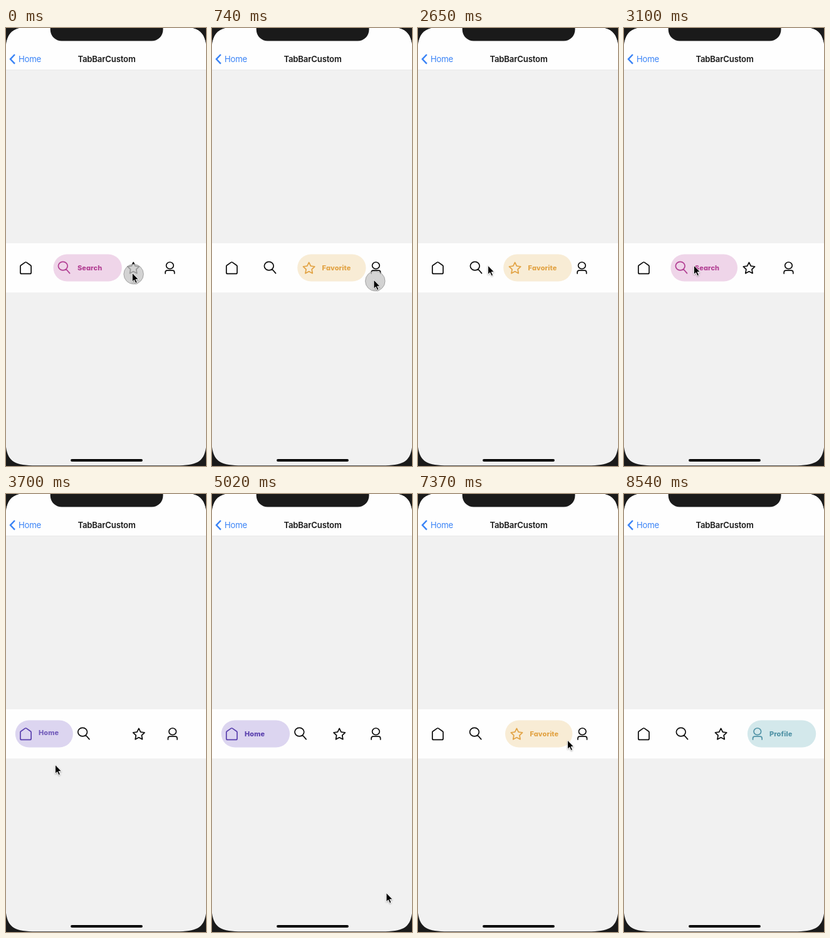
These frames come from a looping animation (319 by 694 pixels, 8.69 s). An HTML page:

```html
<!DOCTYPE html>
<html lang="en">
<head>
<meta charset="utf-8">
<title>Tab bar</title>
<style>
  html, body { margin: 0; width: 100%; height: 100%; overflow: hidden; background: #1a1a1a; }
  svg { display: block; width: 319px; height: 694px; font-family: Inter, "Open Sans", sans-serif; }
  .nav { font-size: 13.2px; letter-spacing: -.19px; }
  .label { font-size: 11px; font-weight: 800; letter-spacing: .1px; font-feature-settings: "cv11"; }
  .icon { fill: none; stroke-width: 1.7; stroke-linecap: round; stroke-linejoin: round; }
</style>
</head>
<body>
<svg viewBox="0 0 319 694">
  <defs>
    <clipPath id="screen"><path id="outline"/></clipPath>
    <filter id="shade" x="-50%" y="-50%" width="200%" height="200%">
      <feDropShadow dx="0" dy="1" stdDeviation=".8" flood-opacity=".35"/>
    </filter>
  </defs>
  <rect width="319" height="694" fill="#1a1a1a"/>
  <g clip-path="url(#screen)">
    <rect x="-2" y="-3" width="323" height="698" fill="#f1f1f1"/>
    <rect x="-2" y="-3" width="323" height="69" fill="#fefefe"/>
    <rect y="66" width="319" height="1" fill="#e9e9e9"/>
    <path d="M70.7 -3V2.5a18 18 0 0 0 18 18H232.5a18 18 0 0 0 18-18V-3Z" fill="#1a1a1a"/>
    <path d="M14 42L7 49.3L14 56.6" fill="none" stroke="#3983f6" stroke-width="2.4"/>
    <text class="nav" x="19.9" y="54.3" fill="#3983f6">Home</text>
    <text class="nav" x="160.5" y="54.3" fill="#1a1a1a" font-weight="600" text-anchor="middle">TabBarCustom</text>
    <rect x="-2" y="341" width="323" height="78" fill="#fefefe"/>
    <g id="tabs"></g>
    <rect x="103.1" y="683" width="114.8" height="3.9" rx="1.95"/>
  </g>
  <circle id="touch" r="15.7" fill="rgba(197,197,197,.76)" stroke="#929292" stroke-width=".8"/>
  <path id="cursor" d="M0 0V14.2L3.2 11.2L5.6 16.4L8 15.3L5.6 10.3H10Z" stroke="#fff" stroke-width=".9" filter="url(#shade)"/>
</svg>
<script>
const LOOP = 8690, STEPS = 59, STEP = LOOP / STEPS;
const OPEN = 350, PRESS = 125;
const LEFT = 14.8, WIDTH = 291.4, GROW = .8;

const $ = id => document.getElementById(id);
const clamp = x => Math.min(1, Math.max(0, x));
const easeOut = x => 1 - (1 - x) ** 3;
const easeInOut = x => x < .5 ? 2 * x * x : 1 - 2 * (1 - x) ** 2;

// Rectangle with continuous corners: e is the reach of a corner, c its control offset
function smoothRect(x, y, w, h, e) {
  const c = e * .176, s = w - 2 * e, v = h - 2 * e;
  return `M${x} ${y + e}c0 ${c - e} ${c} ${-e} ${e} ${-e}h${s}`.replace(`c0 ${c - e} ${c} ${-e}`, `c0 ${c - e} ${c} ${-e}`) +
    `c${e - c} 0 ${e} ${c} ${e} ${e}v${v}c0 ${e - c} ${-c} ${e} ${-e} ${e}` +
    `h${-s}c${c - e} 0 ${-e} ${-c} ${-e} ${-e}Z`;
}
$('outline').setAttribute('d', smoothRect(-1.1, -2.3, 321.3, 695.5, 49));

const ellipse = (x, y, rx, ry) =>
  `M${x - rx} ${y}a${rx} ${ry} 0 1 1 ${2 * rx} 0a${rx} ${ry} 0 1 1 ${-2 * rx} 0`;

const star = 'M' + Array.from({ length: 10 }, (_, i) => {
  const r = i % 2 ? 4.8 : 9.6, a = i * Math.PI / 5;
  return `${r * Math.sin(a)} ${1 - r * Math.cos(a)}`;
}).join('L') + 'Z';

const tabs = [
  { name: 'Home', fg: '#5a40ae', bg: '#dcd5f0', iconX: 16.7, textX: 37.2,
    d: 'M-8.6 -2.2q0-1.1.9-1.8L-1.1-8.6q1.1-.8 2.2 0L7.7-4q.9.7.9 1.8V7.4q0 2-2 2H-6.6q-2 0-2-2Z' },
  { name: 'Search', fg: '#b23f93', bg: '#efd5e9', iconX: 16.9, textX: 38.4,
    d: ellipse(-1.6, -2.9, 7.4, 6.8) + 'M3.6 2.2L9.2 8.6' },
  { name: 'Favorite', fg: '#e2a344', bg: '#f8ecd5', iconX: 18.4, textX: 39.4, d: star },
  { name: 'Profile', fg: '#5193a6', bg: '#d3e8eb', iconX: 15.9, textX: 35,
    d: ellipse(0, -3.7, 5.8, 5.3) + 'M-7.3 9V7.2a3 3 0 0 1 3-3H4.3a3 3 0 0 1 3 3V9' }
];

// Pointer visits as stops: time, place, and the tab opened there, if any
const visits = [
  [
    { t: 0, x: 201.3, y: 388 },
    { t: 120, x: 201.3, y: 388, tab: 2 },
    { t: 780, x: 258, y: 399, tab: 3 },
    { t: 1800, x: 138, y: 387.5, tab: 2 },
    { t: 2830, x: 111.5, y: 376.3, tab: 1 },
    { t: 3540, x: 58, y: 389, tab: 0 },
    { t: 3680, x: 78.5, y: 429 },
    { t: 4720, x: 278, y: 632 },
    { t: 5440, x: 288, y: 700 }
  ],
  [
    { t: 5730, x: 255, y: 540 },
    { t: 6540, x: 149.3, y: 370, tab: 1 },
    { t: 7090, x: 201.3, y: 388, tab: 2 },
    { t: 7360, x: 238.5, y: 390 },
    { t: 7570, x: 258, y: 392, tab: 3 },
    { t: 8530, x: 288, y: 700 }
  ]
];
const opens = [{ t: -OPEN, tab: 1 }, ...visits.flat().filter(s => 'tab' in s)];

function add(parent, tag, attrs) {
  const el = document.createElementNS('http://www.w3.org/2000/svg', tag);
  for (const key in attrs) el.setAttribute(key, attrs[key]);
  return parent.appendChild(el);
}

for (const tab of tabs) {
  tab.group = add($('tabs'), 'g', {});
  tab.pill = add(tab.group, 'rect', { y: 358.5, height: 43, rx: 21.5, fill: tab.bg });
  tab.icon = add(tab.group, 'path', { class: 'icon', d: tab.d, transform: `translate(${tab.iconX} 380)` });
  tab.label = add(tab.group, 'text', { class: 'label', x: tab.textX, fill: tab.fg });
  tab.label.textContent = tab.name;
}

// Tabs share the bar like flex items; the opening one runs ahead of the closing one
function drawTabs(t) {
  const n = opens.findLastIndex(o => o.t <= t);
  const active = opens[n].tab, last = n ? opens[n - 1].tab : -1;
  const x = clamp((t - opens[n].t) / OPEN), shown = easeOut(x);
  const weights = tabs.map((_, i) =>
    1 + GROW * (i === active ? shown : i === last ? 1 - easeInOut(x) : 0));
  const unit = WIDTH / weights.reduce((a, b) => a + b);
  let left = LEFT;
  tabs.forEach((tab, i) => {
    const on = i === active, width = weights[i] * unit;
    tab.group.setAttribute('transform', `translate(${left} 0)`);
    tab.pill.setAttribute('width', width);
    tab.pill.setAttribute('opacity', on ? 1 : 0);
    tab.icon.setAttribute('stroke', on ? tab.fg : '#0c0c0c');
    tab.label.setAttribute('opacity', on ? shown : 0);
    tab.label.setAttribute('y', 374 + 10 * shown);
    left += width;
  });
}

// The pointer rests after a stop, then glides and settles before the next
function pointerAt(t) {
  const stops = visits.find(v => t >= v[0].t && t < v.at(-1).t);
  if (!stops) return null;
  const i = stops.findIndex(s => s.t > t), a = stops[i - 1], b = stops[i];
  const k = easeInOut(clamp(((t - a.t) / (b.t - a.t) - .4) / .45));
  return { x: a.x + (b.x - a.x) * k, y: a.y + (b.y - a.y) * k };
}

function drawPointer(t) {
  const tip = pointerAt(t);
  const held = tip && opens.some(o => t < o.t && t >= o.t - PRESS);
  $('cursor').style.display = tip ? '' : 'none';
  $('touch').style.display = held ? '' : 'none';
  if (!tip) return;
  $('cursor').setAttribute('transform', `translate(${tip.x} ${tip.y})`);
  $('touch').setAttribute('transform', `translate(${tip.x + 2.3} ${tip.y + 2})`);
}

const begin = performance.now();
function tick() {
  // The picture advances in held steps
  const t = Math.max(0, performance.now() - begin) % LOOP;
  const held = Math.min(STEPS - 1, Math.floor((t + 8) / STEP)) * STEP;
  drawTabs(held);
  drawPointer(held);
  requestAnimationFrame(tick);
}
tick();
</script>
</body>
</html>
```
